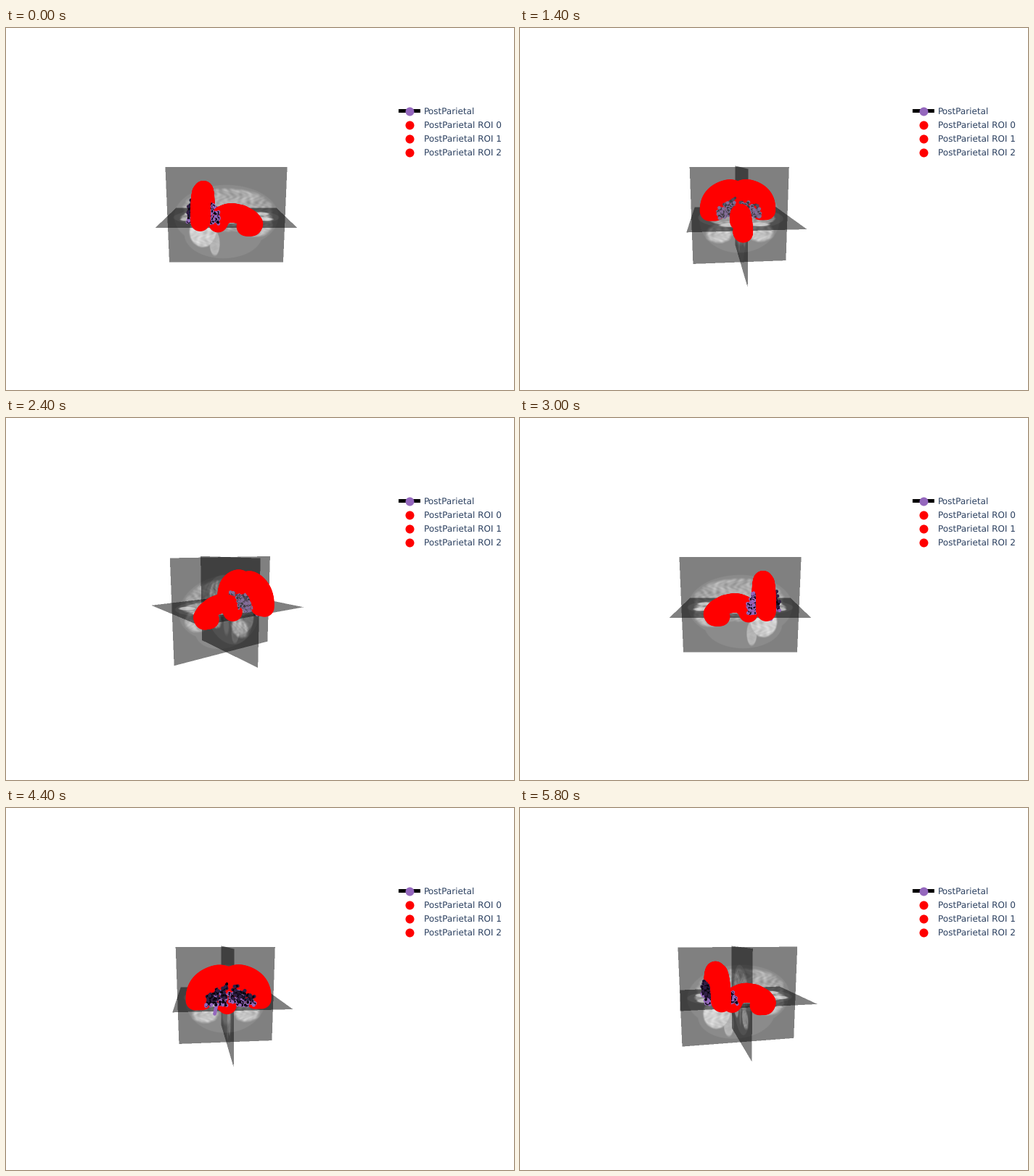
Recreate the animation shown at these times as a matplotlib script. Size 700 px wide and 500 px high, loop 6000 ms.

```python
import numpy as np
import matplotlib.pyplot as plt
from matplotlib.animation import FuncAnimation

plt.rcParams["text.hinting"] = "none"

W, H, DPI = 700, 500, 100
FRAMES, INTERVAL = 30, 200

# Camera: orbit around the origin at a fixed pitch
CX, CY, FOCAL, DIST = 303.5, 260.0, 386.3, 4.76
PITCH = np.arctan(0.202)
HALF = np.array([0.82, 1.0, 0.825])
X0, Y0, VIEW_W, VIEW_H, SS = 190, 180, 224, 186, 2

PURPLE = np.array([148, 103, 189]) / 255
DARK = np.array([0.19, 0.12, 0.27])
BLACK = np.array([0.04, 0.02, 0.06])
RED = np.array([1.0, 0, 0])


def camera(theta):
    """Return the axes (toward the viewer, right, up)."""
    c, s = np.cos(theta), np.sin(theta)
    cp, sp = np.cos(PITCH), np.sin(PITCH)
    return (np.array([cp * c, cp * s, sp]), np.array([-s, c, 0.0]),
            np.array([-sp * c, -sp * s, cp]))


def project(pts, cam):
    toward, right, up = cam
    depth = DIST - pts @ toward
    x = CX + FOCAL * (pts @ right) / depth
    y = CY - FOCAL * (pts @ up) / depth
    return np.column_stack([x, y]), depth


# --- slice textures -------------------------------------------------------
def blob(u, v, cu, cv, ru, rv, soft=0.08):
    r = np.hypot((u - cu) / ru, (v - cv) / rv)
    return np.clip((1 - r) / soft, 0, 1)


def folds(u, v, k=0.0):
    a = np.sin(23 * u + 2.6 * np.sin(13 * v + k) + k)
    b = np.cos(19 * v + 2.2 * np.sin(17 * u - k))
    fine = np.sin(47 * u + 3 * np.sin(29 * v + k)) * np.sin(41 * v + 2 * k)
    return 0.5 + 0.32 * a * b + 0.18 * fine


def sagittal(x, y, z):
    f = folds(y, z, 0.7)
    layers = [
        0.09 * blob(y, z, 0, -0.02, 0.9, 0.56, 0.03),
        0.09 * blob(y, z, -0.05, -0.33, 0.68, 0.43, 0.03),
        (0.12 + 0.42 * f) * blob(y, z, 0.02, 0.1, 0.82, 0.4, 0.14),
        (0.2 + 0.4 * f) * blob(y, z, 0.52, -0.15, 0.3, 0.24, 0.2),
        (0.42 + 0.36 * f) * blob(y, z, -0.4, -0.28, 0.25, 0.29, 0.14),
        (0.36 + 0.12 * f) * blob(y, z, -0.2, -0.48, 0.1, 0.25, 0.2),
    ]
    return np.maximum.reduce(layers)


def coronal(x, y, z):
    ax = np.abs(x)
    f = folds(ax, z, 1.9)
    layers = [
        0.09 * blob(x, z, 0, -0.06, 0.7, 0.6, 0.03),
        (0.08 + 0.42 * f) * blob(ax, z, 0.25, 0.1, 0.32, 0.35, 0.2),
        (0.3 + 0.4 * f) * blob(ax, z, 0.36, -0.3, 0.26, 0.19, 0.3),
        0.26 * blob(x, z, 0, -0.33, 0.12, 0.26, 0.5),
    ]
    return np.maximum.reduce(layers)


def axial(x, y, z):
    ax = np.abs(x)
    f = folds(ax, y, 3.1)
    layers = [
        0.09 * blob(x, y, 0, 0, 0.72, 0.9, 0.03),
        (0.3 + 0.5 * f) * blob(x, y, 0, 0, 0.6, 0.8),
        0.9 * blob(ax, y, 0.22, 0.62, 0.18, 0.16, 0.3),
        0.9 * blob(ax, y, 0.22, -0.64, 0.18, 0.12, 0.3),
    ]
    return np.maximum.reduce(layers)


SLICES = [(0, sagittal), (1, coronal), (2, axial)]
gx = X0 + (np.arange(VIEW_W * SS) + 0.5) / SS
gy = Y0 + (np.arange(VIEW_H * SS) + 0.5) / SS
RAY_X, RAY_Y = np.meshgrid((gx - CX) / FOCAL, (CY - gy) / FOCAL)


def render_slices(cam):
    """Ray-cast the three half transparent planes."""
    toward, right, up = cam
    eye = DIST * toward
    rays = [RAY_X * right[i] + RAY_Y * up[i] - toward[i] for i in range(3)]
    img = np.ones(RAY_X.shape)
    for axis, texture in SLICES:
        with np.errstate(all="ignore"):
            t = -eye[axis] / rays[axis]
            hit = [eye[i] + t * rays[i] for i in range(3)]
            inside = np.isfinite(t)
            for i in range(3):
                if i != axis:
                    inside &= np.abs(hit[i]) <= HALF[i]
        if inside.any():
            img[inside] = 0.5 * img[inside] + 0.5 * texture(
                *(h[inside] for h in hit))
    return img.reshape(VIEW_H, SS, VIEW_W, SS).mean(axis=(1, 3))


# --- markers --------------------------------------------------------------
def arch(scale):
    """One layer of the two-humped arch across both hemispheres."""
    a = np.linspace(0, np.pi, 56)
    c, s = np.cos(a), np.sin(a)
    x = 0.52 * scale * np.sign(c) * np.abs(c) ** 0.9
    z = 0.02 + 0.42 * scale * s ** 0.82 - 0.045 * np.exp(-(x / 0.1) ** 2)
    return np.column_stack([x, np.full_like(x, -0.395), z])


def roi_points():
    path = np.array([[-0.14, -0.115], [-0.08, 0.01], [0.02, 0.05],
                     [0.11, 0.06], [0.26, 0.03], [0.40, -0.05],
                     [0.465, -0.13], [0.44, -0.18], [0.34, -0.18]])
    s = np.linspace(0, len(path) - 1, 50)
    k = np.arange(len(path))
    band = np.column_stack([np.zeros(50), np.interp(s, k, path[:, 0]),
                            np.interp(s, k, path[:, 1])])
    return np.vstack([arch(1), arch(0.9), arch(0.8), band])


def network():
    rng = np.random.default_rng(12)
    pts, cols, sizes = [], [], []

    def add(p, col, r):
        pts.append(p)
        cols.append(col)
        sizes.append(r)

    for side in (-1, 1):
        u, v, w = rng.random((3, 130))
        y = -0.62 + 0.5 * v
        top = 0.36 * (1 - 0.5 * u) * np.clip((-0.05 - y) / 0.2, 0.2, 1)
        nodes = np.column_stack([side * (0.03 + 0.35 * u), y,
                                 -0.06 + top * w])
        for p in nodes:
            bright = p[2] < 0.05 or p[1] > -0.3
            add(p, PURPLE if bright else DARK, 2.4)
            near = np.argsort(np.sum((nodes - p) ** 2, axis=1))[1:3]
            for q in nodes[near]:
                for t in np.linspace(0.2, 0.5, 4):
                    add(p + t * (q - p), BLACK, 1.5)
    for t in np.linspace(0, 1, 8):
        add(np.array([-0.2 - 0.03 * t, -0.5, -0.02 - 0.15 * t]), PURPLE, 2.4)
    return np.array(pts), np.array(cols), np.array(sizes)


def area(r):
    return (2 * np.asarray(r) * 72 / DPI) ** 2


roi = roi_points()
net, net_cols, net_r = network()
all_pts = np.vstack([net, roi])
all_area = area(np.concatenate([net_r, np.full(len(roi), 13.3)]))
roi_cols = np.tile(RED, (len(roi), 1))

# --- figure ---------------------------------------------------------------
fig = plt.figure(figsize=(W / DPI, H / DPI), dpi=DPI, facecolor="white")
ax = fig.add_axes([0, 0, 1, 1])
image = ax.imshow(np.ones((VIEW_H, VIEW_W)), cmap="gray", vmin=0, vmax=1,
                  extent=(X0, X0 + VIEW_W, Y0 + VIEW_H, Y0),
                  interpolation="nearest", aspect="auto")
dots = ax.scatter(all_pts[:, 0], all_pts[:, 1], s=all_area, linewidths=0,
                  zorder=3)
ax.set_xlim(0, W)
ax.set_ylim(H, 0)
ax.axis("off")

LEGEND_X, LEGEND_Y = 535.94, 114.5
ax.plot([LEGEND_X + 5, LEGEND_X + 35], [LEGEND_Y] * 2, color="black",
        lw=5 * 72 / DPI, solid_capstyle="butt", snap=False, zorder=4)
LABELS = ["PostParietal"] + [f"PostParietal ROI {i}" for i in range(3)]
for i, label in enumerate(LABELS):
    y = LEGEND_Y + 19 * i
    ax.scatter([LEGEND_X + 20], [y], s=area(6), color=[RED if i else PURPLE],
               linewidths=0, zorder=5)
    ax.text(LEGEND_X + 40, y + 4.68, label, family="DejaVu Sans",
            size=12 * 72 / DPI, color="#2a3f5f", va="baseline")


def update(i):
    cam = camera(2 * np.pi * i / FRAMES)
    image.set_data(render_slices(cam))
    xy, depth = project(all_pts, cam)
    # The coronal plane dims the network when seen from the front
    blocked = net[:, 1] * cam[0][1] < -1e-9
    keep = np.where(blocked, 0.5, 1.0)[:, None]
    cols = np.vstack([net_cols * keep + 0.45 * (1 - keep), roi_cols])
    order = np.argsort(-depth)
    dots.set_offsets(xy[order])
    dots.set_sizes(all_area[order])
    dots.set_facecolors(cols[order])
    return image, dots


anim = FuncAnimation(fig, update, frames=FRAMES, interval=INTERVAL,
                     repeat=True, repeat_delay=0, init_func=lambda: update(0))
plt.show()
```
